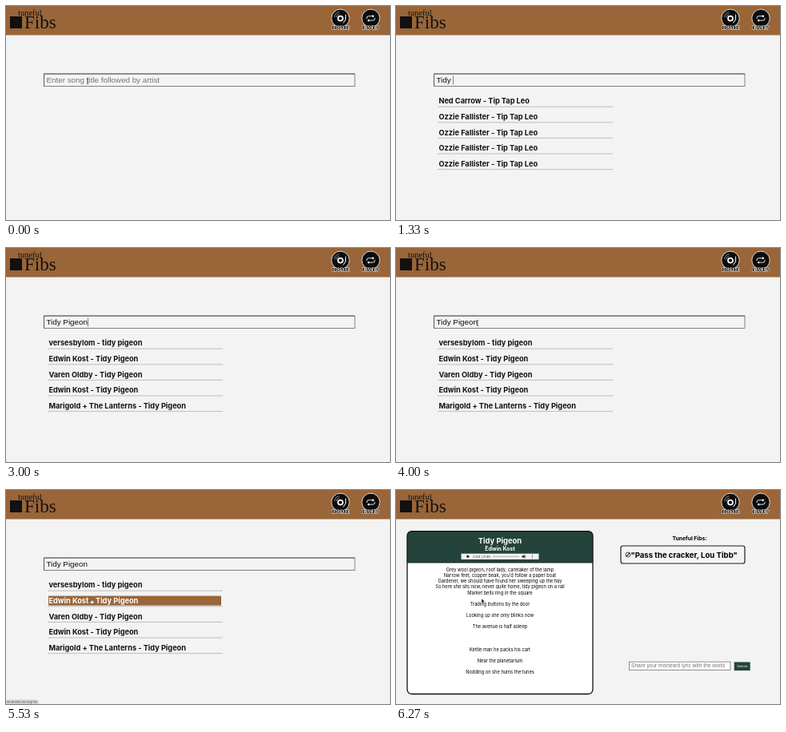
Write an HTML page that moves like this. It is 480x268 px and loops after 8000 ms.

```html
<!DOCTYPE html>
<html lang="en">
<head>
<meta charset="utf-8">
<title>Song search</title>
<style>
html, body { margin: 0; width: 100%; height: 100%; overflow: hidden; background: #f3f3f3; }
svg { display: block; width: 100vw; height: 100vh; }
text { font-family: Inter, "Open Sans", sans-serif; white-space: pre; }
.field { font-family: "Liberation Sans", Arial, sans-serif; font-size: 9.85px; }
.bold { font-weight: 700; }
.row { font-weight: 700; font-size: 9.2px; }
.mid { text-anchor: middle; }
.serif { font-family: "Liberation Serif", serif; }
.nav { font: 700 7px "Liberation Serif", serif; text-anchor: middle; stroke: #f4ece4; stroke-width: .9px; paint-order: stroke; stroke-linejoin: round; }
.lyric { font-size: 5.7px; text-anchor: middle; }
</style>
</head>
<body>
<svg viewBox="0 0 480 268" preserveAspectRatio="none">
  <rect width="480" height="268" fill="#f3f3f3"/>

  <g id="header">
    <rect width="480" height="36.5" fill="#996539"/>
    <rect x="5" y="13" width="15" height="15" fill="#111"/>
    <text class="serif" x="15" y="11.5" font-size="10.5" fill="#111">tuneful</text>
    <text class="serif" x="23" y="28" font-size="23" fill="#111">Fibs</text>
    <g id="homeIcon">
      <circle cx="418" cy="15.3" r="11.2" fill="#0c0c0c" stroke="#f4ece4" stroke-width=".9"/>
      <g fill="none" stroke="#ddd" stroke-width=".6">
        <path d="M410.5 14a8 8 0 0 1 6-6.5M412.6 14.4a5.6 5.6 0 0 1 4-4.4"/>
        <path d="M424.6 10.5v6.5l-3.2 4.4" stroke="#fff" stroke-width="1"/>
        <circle cx="418" cy="15.6" r="3" stroke="#fff" stroke-width="1.7"/>
      </g>
      <text class="nav" x="418.5" y="28.9">HOME</text>
    </g>
    <g id="favesIcon">
      <circle cx="456" cy="15.3" r="11.2" fill="#0c0c0c" stroke="#f4ece4" stroke-width=".9"/>
      <path d="M451 16v-1q0-2.3 2.3-2.3h5M461 14.8v1q0 2.3-2.3 2.3h-5" fill="none" stroke="#fff" stroke-width=".9"/>
      <path d="M458 11l2.6 1.7-2.6 1.7zM454 16.4l-2.6 1.7 2.6 1.7z" fill="#fff"/>
      <text class="nav" x="456" y="28.9">FAVES</text>
    </g>
  </g>

  <g id="search">
    <rect x="47.5" y="85" width="388.5" height="15.5" fill="#f4f4f4" stroke="#777" stroke-width=".9"/>
    <path d="M47.5 100.5V85H436" fill="none" stroke="#555" stroke-width=".9"/>
    <text id="query" class="field" x="50.4" y="96.2"></text>
    <rect id="caret" y="87.5" width=".6" height="11" fill="#333"/>
    <g id="results"></g>
  </g>

  <g id="song">
    <rect x="14" y="51.7" width="232" height="203.8" rx="5.5" fill="#fff"/>
    <path d="M14 91V57.2q0-5.5 5.5-5.5h221q5.5 0 5.5 5.5V91z" fill="#24433b"/>
    <path d="M14 91h232" stroke="#111" stroke-width=".8"/>
    <rect x="14" y="51.7" width="232" height="203.8" rx="5.5" fill="none" stroke="#111" stroke-width="1.3"/>
    <g id="words">
      <text class="bold mid" x="130" y="66.8" font-size="9.4" fill="#fff">Tidy Pigeon</text>
      <text class="bold mid" x="130" y="75.7" font-size="6.9" fill="#fff">Edwin Kost</text>
      <g id="lines"></g>
    </g>
    <g id="audio">
      <rect x="81.5" y="79.7" width="97" height="7.2" fill="#f1f3f4"/>
      <path d="M88.6 81.3l3.6 2-3.6 2z"/>
      <text id="time" x="96.3" y="84.8" font-size="4.1" fill="#222"></text>
      <rect id="bar" y="82.8" height="1.1" rx=".5" fill="#b9bbbc"/>
      <g id="volume">
        <path d="M157.6 82.4h1.2l1.6-1.4v4.6l-1.6-1.4h-1.2z"/>
        <path d="M161.1 81.6q1.7 1.7 0 3.4" fill="none" stroke="#000" stroke-width=".6"/>
      </g>
      <path d="M170.3 81v.9M170.3 82.9v.9M170.3 84.8v.9" stroke="#222" stroke-width=".9"/>
    </g>
    <text class="bold mid" x="367" y="62.6" font-size="6.8">Tuneful Fibs:</text>
    <rect x="281" y="70" width="155" height="22" rx="2.5" fill="#f4f4f4" stroke="#1c1c1c" stroke-width="1.2"/>
    <g id="quote">
      <circle cx="290" cy="81" r="3" fill="none" stroke="#222" stroke-width=".8"/>
      <path d="M288.2 82.8l3.8-3.8" stroke="#222" stroke-width="1.1"/>
      <text class="bold" x="293.4" y="84.5" font-size="9.6">"Pass the cracker, Lou Tibb"</text>
    </g>
    <rect x="291.5" y="215.2" width="126.5" height="10.3" fill="#fff" stroke="#777" stroke-width=".8"/>
    <text class="field" x="294" y="222.4" style="font-size:6.6px" fill="#757575">Share your misheard lyric with the world</text>
    <rect x="422.7" y="215.5" width="20" height="10.6" fill="#24433b"/>
    <text class="field mid" x="432.7" y="222.1" style="font-size:4.1px" fill="#fff">Submit</text>
  </g>

  <g id="status">
    <path d="M0 263h38.5q1.5 0 1.5 1.5v4H0z" fill="#dedede" stroke="#aaa" stroke-width=".4"/>
    <text x="1" y="267" font-size="3.8" fill="#444">localhost:3000/lyrics</text>
  </g>

  <g id="pointer">
    <path id="beam" d="M-1.2-3.6Q0-3.6 0-2.8Q0-3.6 1.2-3.6M0-3V3M-1.2 3.6Q0 3.6 0 2.8Q0 3.6 1.2 3.6" fill="none" stroke="#222" stroke-width=".6"/>
    <path id="arrow" d="M0-3v5.6l1.3-1.2.9 2 .9-.4-.9-1.9h1.8z" fill="#000" stroke="#fff" stroke-width=".4"/>
    <path id="hand" d="M-.6-2.4q.6-.7 1.1 0v2l2 .5q.7.3.5 1.3l-.6 2H-.5l-2-2.4q-.2-.8.6-.7l1.3.7z" fill="#fff" stroke="#222" stroke-width=".5"/>
  </g>
</svg>
<script>
const LOOP = 8000, PITCH = 19.6, CLICK = 5600;
const $ = id => document.getElementById(id);
const show = (id, on) => $(id).style.display = on ? "" : "none";

const title = "Tidy Pigeon";
const keyTimes = [200, 470, 600, 930, 1200, 1670, 2130, 2400, 2670, 2730, 3000];
const lead = "Ozzie Fallister - Tip Tap Leo";
const found = ["versesbylom - tidy pigeon", "Edwin Kost - Tidy Pigeon", "Varen Oldby - Tidy Pigeon",
  "Edwin Kost - Tidy Pigeon", "Marigold + The Lanterns - Tidy Pigeon"];
const partial = ["Cobble Lane - Tidy Pines", "Edwin Kost - Tidy Pigeon", "Orla Venn - Tidy Pictures",
  "Edwin Kost - Tidy Pigeon", "versesbylom - tidy pigeon"];

// Each answer arrives a little after the key that asked for it.
const answers = [
  [0, []],
  [1000, ["Nell Barrow - Tide", "Hobb & Wren - Tidings", "Olu Marsh - Tidewater", "Nell Barrow - Tide", "The Pelmets - Tidy Up"]],
  [1330, ["Ned Carrow - Tip Tap Leo", lead, lead, lead, lead]],
  [1730, ["The Pelmets - Tidy Up", "Cobble Lane - Tidy Little Rooms", "Orla Venn - Tidy", "Gus Merrin - Tidy Morning Song", "Hobb & Wren - Tidy"]],
  [2070, ["Jeremy P Hollowan - A Tidy Coat (Mark Tellis\nRadio Edit)", "Rocha Vestin et son orchestre - Waltz for Tidy",
    "La Brindle - P", "versesbylom - tidy pigeon", "Edwin Kost - Tidy Pigeon"]],
  [2530, partial],
  [2730, ["versesbylom - tidy pigeon", "Varen Oldby - Tidy Pigeon", "Edwin Kost - Tidy Pigeon", ...partial.slice(3)]],
  [3000, found],
  [3070, ["Edwin Kost - Tidy Pigeon", "Varen Oldby - Tidy Pigeon", "Marigold + The Lanterns - Tidy Pigeon (Live)", ...found.slice(3)]],
  [3330, found]
];

const lyrics = [
  [102, "Grey wool pigeon, roof lady, caretaker of the lamp"],
  [109.1, "Narrow feet, copper beak, you'd follow a paper boat"],
  [116.2, "Gardener, we should have found her sweeping up the hay"],
  [123.4, "So here she sits now, never quite home, tidy pigeon on a rail"],
  [130.5, "Market bells ring in the square"],
  [144.7, "Trading buttons by the door"],
  [158.9, "Looking up she only blinks now"],
  [173.1, "The avenue is half asleep"],
  [201.6, "Kettle man he packs his cart"],
  [215.8, "Near the planetarium"],
  [230, "Nodding on she hums the tunes"]
];
$("lines").innerHTML = lyrics.map(([y, s]) => `<text class="lyric" x="130" y="${y}">${s}</text>`).join("");

const escapeText = s => s.replace(/&/g, "&amp;");
let shown = "";

function drawResults(list, hover) {
  const key = list.join("|") + hover;
  if (key === shown) return;
  shown = key;
  let y = 126.2, out = "";
  list.forEach((item, i) => {
    const parts = item.split("\n"), on = i === hover;
    if (on) out += `<rect x="53" y="${y - 13.2}" width="216" height="12" fill="#996539"/>`;
    parts.forEach((s, n) => {
      out += `<text class="row" x="53.4" y="${y - 3.8 + n * 12}" fill="${on ? "#fff" : "#111"}">${escapeText(s)}</text>`;
    });
    y += (parts.length - 1) * 12;
    out += `<path d="M52 ${y}H271" stroke="#a8a8a8" stroke-width=".7"/>`;
    y += PITCH;
  });
  $("results").innerHTML = out;
}

function caretOn(t) {
  if (t < 200) return false;
  if (t < 3530) return true;
  return (t >= 4070 && t < 4530) || (t >= 5070 && t < 5530);
}

function drawSearch(t, hover) {
  const typed = title.slice(0, keyTimes.filter(k => t >= k).length);
  const query = $("query");
  query.textContent = typed || "Enter song title followed by artist";
  query.setAttribute("fill", typed ? "#111" : "#757575");
  show("caret", caretOn(t));
  if (typed) $("caret").setAttribute("x", 50.4 + query.getComputedTextLength());
  drawResults(answers.filter(a => t >= a[0]).pop()[1], hover);
}

function drawSong(t) {
  const loaded = t >= 6270;
  show("words", t >= 5930);
  show("quote", t >= 6000);
  show("audio", t >= 6070);
  $("time").textContent = loaded ? "0:00 / 0:30" : "0:00";
  const x = loaded ? 121 : 110;
  $("bar").setAttribute("x", x);
  $("bar").setAttribute("width", 154 - x);
  $("volume").setAttribute("opacity", loaded ? 1 : .4);
}

function draw(t) {
  const onSong = t >= CLICK;
  const p = Math.min(1, Math.max(0, (t - 4000) / 800));
  const e = p * p * (3 - 2 * p);
  const x = 102 + 5 * e, y = 94 + 45 * e;
  const row = Math.floor((y - 113) / PITCH);
  const hover = y >= 113 && y - 113 - row * PITCH < 12 ? row : -1;

  show("search", !onSong);
  show("song", onSong);
  if (onSong) drawSong(t); else drawSearch(t, hover);

  show("status", hover >= 0 && t < 5930);
  show("pointer", t < 200 || t >= 4000);
  $("pointer").setAttribute("transform", `translate(${x} ${y})`);
  const shape = onSong ? "arrow" : y < 101 ? "beam" : hover >= 0 ? "hand" : "arrow";
  for (const id of ["beam", "arrow", "hand"]) show(id, id === shape);
}

const start = performance.now();
function tick() {
  draw((performance.now() - start) % LOOP);
  requestAnimationFrame(tick);
}
tick();
</script>
</body>
</html>
```
